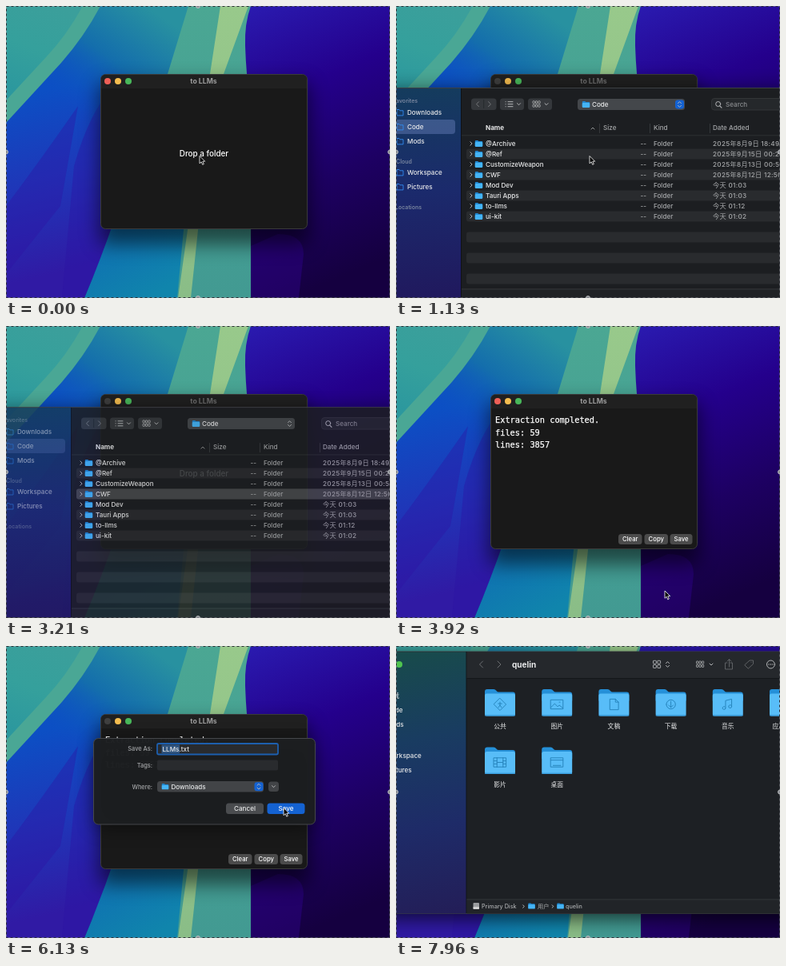
These frames come from a looping animation (480 px wide and 365 px high, 8 s). An HTML page:

```html
<!DOCTYPE html>
<html lang="en">
<head>
<meta charset="utf-8">
<title>to LLMs</title>
<style>
html, body { margin: 0; width: 100%; height: 100%; overflow: hidden; background: #1a0a60; }
svg { display: block; width: 480px; height: 365px; }
text { font-family: Inter, "Noto Sans CJK SC", "Noto Sans CJK", sans-serif; font-size: 8.1px; font-weight: 500; fill: #e8e9ea; white-space: pre; }
.mono text { font-family: "DejaVu Sans Mono", monospace; font-size: 10.3px; font-weight: 400; fill: #fff; stroke: #fff; stroke-width: .25px; }
.line { fill: none; stroke: #b4b6b8; stroke-linecap: round; stroke-linejoin: round; }
</style>
</head>
<body>
<svg id="stage" viewBox="0 0 480 365" xmlns="http://www.w3.org/2000/svg"></svg>
<script>
const LOOP = 8000;
const stage = document.getElementById('stage');
const range = (n, f) => Array.from({ length: n }, (_, i) => f(i)).join('');

// Markup helpers
const rect = (x, y, w, h, fill, r = 0, more = '') =>
  `<rect x="${x}" y="${y}" width="${w}" height="${h}" rx="${r}" fill="${fill}" ${more}/>`;
const text = (x, y, s, more = '') => `<text x="${x}" y="${y}" ${more}>${s}</text>`;
const mid = (x, y, s, more = '') => text(x, y, s, 'text-anchor="middle" ' + more);
const dot = (x, y, r, fill) => `<circle cx="${x}" cy="${y}" r="${r}" fill="${fill}"/>`;
const line = (d, w = 1, more = '') => `<path class="line" d="${d}" stroke-width="${w}" ${more}/>`;
const shape = (d, fill, opacity = 1) => `<path d="${d}" fill="${fill}" opacity="${opacity}"/>`;
const group = (id, body) => `<g id="${id}">${body}</g>`;
const css = s => `style="${s}"`;
const shadow = (x, y, w, h, opacity) => rect(x, y, w, h, '#000', 8, `opacity="${opacity}" filter="url(#soft)"`);
const gradient = (id, x1, y1, x2, y2, ...stops) =>
  `<linearGradient id="${id}" gradientUnits="userSpaceOnUse" x1="${x1}" y1="${y1}" x2="${x2}" y2="${y2}">` +
  stops.map((c, i) => `<stop offset="${i / (stops.length - 1)}" stop-color="${c}"/>`).join('') + '</linearGradient>';

// Small icons
const folder = (x, y, s = 1) => `<g transform="translate(${x} ${y}) scale(${s})">` +
  shape('M-4.7 -3q0 -1 1 -1h2.5l1 1h4q.9 0 .9 1v5h-9.4z', '#2187cf') +
  rect(-4.7, -2, 9.4, 6, '#45b4f5', 1) + '</g>';
const right = (x, y, s) => line(`M${x - s / 2} ${y - s}l${s} ${s}l${-s} ${s}`);
const left = (x, y, s) => line(`M${x + s / 2} ${y - s}l${-s} ${s}l${s} ${s}`);
const down = (x, y) => line(`M${x - 2} ${y - 1}l2 2l2 -2`);
const upDown = (x, y) => line(`M${x - 2} ${y - 1.4}l2 -2l2 2M${x - 2} ${y + 1.4}l2 2l2 -2`);
const tiles = (x, y) => range(6, i =>
  rect(x + i % 3 * 3.4, y + (i > 2 ? 4.4 : 0), 2.4, 3, 'none', .5, 'stroke="#b4b6b8" stroke-width=".8"'));
const outline = (x, y) => line(`M${x - 4} ${y + 3.5}v-7h3l1 1.3h4v5.7z`, .9, css('stroke:#318bf0'));

const defs = '<defs>' +
  gradient('indigo', 300, 0, 440, 330, '#2a1bb0', '#24008c', '#1d0062', '#150040') +
  gradient('blue', 30, 110, 80, 330, '#0c4fc4', '#1f36b8', '#301aa4') +
  gradient('sea', 175, 0, 85, 130, '#2891a0', '#146eac', '#0c4fc400') +
  gradient('deep', 100, 230, 180, 365, '#0e62b6', '#1085ac') +
  gradient('mint', 0, 0, 0, 365, '#4ba793', '#45a094', '#429a92') +
  gradient('corner', 20, 110, 60, 0, '#2c989e', '#35a09c', '#3b9f9b') +
  gradient('lime', 0, 0, 0, 365, '#98c98b', '#8abd87') +
  gradient('side', 0, 103, 20, 365, '#143c5d', '#1b2a6c', '#20195e') +
  gradient('finderSide', 10, 7, 70, 334, '#184b4b', '#193c61', '#1e2b68', '#231e58') +
  '<filter id="soft" x="-30%" y="-35%" width="160%" height="180%"><feGaussianBlur stdDeviation="12"/></filter></defs>';

const wallpaper =
  rect(0, 0, 480, 365, 'url(#indigo)') +
  shape('M306 300L340 285Q372 285 372 310L366 365H306z', '#30048c', .45) +
  shape('M0 0H250V200L150 240L98 365H0z', 'url(#blue)') +
  shape('M0 250Q45 190 90 125L68 250L0 335z', '#3010a0', .35) +
  shape('M85 200Q105 130 135 100V275L98 365H70z', '#2c12a2', .4) +
  shape('M0 0H250V220H0z', 'url(#sea)') +
  shape('M165 170H245V365H98Q140 265 165 170z', 'url(#deep)') +
  shape('M228 0H306Q298 22 299 50Q300 85 306 130V365H214L222 280L202 85z', 'url(#mint)') +
  shape('M268 0H303L272 85L240 280L231 365H215L227 280L255 85z', 'url(#lime)') +
  shape('M0 0H118Q98 38 69 71L0 146z', '#4aa795') +
  shape('M0 0H96Q75 38 50 64L0 118z', 'url(#corner)');

const button = (x, w, s) => rect(x, 260, w, 13, '#4b4b4b', 3.5) + mid(x + w / 2, 269.3, s, css('font-size:7.7px;fill:#fff'));
const app =
  shadow(116, 96, 263, 202, .55) +
  rect(118.5, 85.5, 258, 193, '#191919', 6, 'stroke="#3a3a3a"') +
  shape('M119 103V92q0 -6 6 -6H370q6 0 6 6V103z', '#202020') +
  `<circle id="red" cx="127" cy="94" r="4"/>` + dot(140, 94, 4, '#f5bd4f') + dot(153, 94, 4, '#48b85a') +
  mid(247, 97, 'to LLMs', 'id="title" ' + css('font-size:8.7px;font-weight:700;fill:#9c9c9c')) +
  group('prompt', mid(247.5, 188.3, 'Drop a folder', css('font-size:9.9px;fill:#fff'))) +
  group('result',
    `<g class="mono">${text(124, 121.3, 'Extraction completed.')}${text(124, 136.8, 'files: 59')}${text(124, 152.3, 'lines: 3857')}</g>` +
    button(278, 29.5, 'Clear') + button(310.5, 29.5, 'Copy') + button(342.5, 28, 'Save'));

const entries = [
  ['@Archive', '2025年8月9日 18:49'], ['@Ref', '2025年9月15日 00:21'],
  ['CustomizeWeapon', '2025年8月13日 00:52'], ['CWF', '2025年8月12日 12:50'],
  ['Mod Dev', '今天 01:03'], ['Tauri Apps', '今天 01:03'], ['to-llms', '今天 01:12'], ['ui-kit', '今天 01:02']
];
const PICKED = 3;
const grey = css('fill:#a6a8aa');
const heading = css('font-size:7px;font-weight:600;fill:#78859f');
const place = (y, s) => outline(5, y) + text(14, y + 3, s);
const row = ([name, date], i) => {
  const y = 172 + 13 * i;
  return right(94, y, 2.2) + folder(103.5, y) + text(112, y + 3, name) + text(313, y + 3, '--', 'text-anchor="end" ' + grey) +
    text(322, y + 3, 'Folder', grey) + text(396, y + 3, date, css('font-size:8.2px;letter-spacing:.3px;fill:#a6a8aa'));
};
const picker =
  shadow(-20, 106, 520, 280, .6) +
  rect(-10, 102.5, 500, 300, '#1c1e21', 0, 'stroke="#3d4044"') +
  rect(0, 103, 81, 262, 'url(#side)') + rect(81, 103, 1, 262, '#101216') +
  group('places', rect(-4, 142, 78, 18, '#8aa0e0', 4, 'opacity=".32"') +
    text(-4, 121, 'Favorites', heading) + place(133, 'Downloads') + place(151, 'Code') + place(169, 'Mods') +
    text(0, 196.5, 'Cloud', heading) + place(208, 'Workspace') + place(226, 'Pictures') + text(-1, 253.5, 'Locations', heading)) +
  rect(94, 115.5, 31.5, 14.5, '#35383c', 3.5) + rect(109.5, 117, .6, 11, '#1c1e21') +
  `<g opacity=".5">${left(102, 122.7, 3)}${right(117, 122.7, 3)}</g>` +
  rect(130, 115.5, 30, 14.5, '#35383c', 3.5) + line('M137 119.7h.2M137 122.7h.2M137 125.7h.2M140 119.7h6M140 122.7h6M140 125.7h6') + down(153.5, 122.7) +
  rect(165, 115.5, 30, 14.5, '#35383c', 3.5) + tiles(171, 118.8) + down(188, 122.7) +
  rect(227, 116, 134, 14, '#44474b', 3.5) + folder(237.5, 123) + text(245, 126, 'Code') +
  group('pickerMark', rect(349, 117.5, 11, 11, '#1462d2', 3)) + upDown(354.5, 123) +
  rect(394.5, 115.5, 100, 14.5, '#25282b', 3.5, 'stroke="#3a3d40" stroke-width=".7"') +
  line('M405 125.2l2 2', 1.1) + '<circle class="line" cx="402.7" cy="122.5" r="3"/>' + text(412, 126, 'Search', css('fill:#8a8c8f')) +
  text(112, 155.3, 'Name', css('font-weight:700')) + line('M244 154l2 -2l2 2', .8) +
  text(259, 155.3, 'Size', grey) + text(322, 155.3, 'Kind', grey) + text(396, 155.3, 'Date Added', grey) +
  [254, 317, 392].map(x => rect(x, 147, .8, 12, '#3c3f43')).join('') + rect(82, 161.5, 398, .7, '#35383b') +
  range(7, i => rect(88, 178.5 + 26 * i, 400, 13, '#292b2e', 3)) +
  rect(88, 165.5 + 13 * PICKED, 400, 13, '#0a58c8', 3, 'id="picked"') +
  entries.map(row).join('') +
  rect(82, 354, 398, 11, '#202225') + rect(82, 353.5, 398, .8, '#3a3d40');

const label = (y, s) => text(183, y, s, 'text-anchor="end" ' + css('font-size:7.4px;fill:#a4a6a8'));
const saver =
  shadow(112, 122, 271, 104, .5) +
  rect(109.5, 115.5, 277, 107.5, '#1c1e21', 6, 'stroke="#45474a" fill-opacity=".97"') +
  label(131.3, 'Save As:') + label(151.5, 'Tags:') + label(178.7, 'Where:') +
  rect(189, 122, 151, 13.5, '#292b2e', 2) + rect(189, 142.5, 151, 13, '#292b2e', 2) +
  rect(189, 122, 151, 13.5, 'none', 2, 'id="ring" stroke="#1d5fae" stroke-width="1.8"') +
  rect(194.5, 123.5, 22.5, 10.5, '#31557f') + text(195.5, 131.6, 'LLMs.txt') +
  rect(189, 169, 133, 13.5, '#424447', 3.5) + folder(199, 175.7, .9) + text(206.5, 178.7, 'Downloads') +
  group('saverMark', rect(310.5, 170.3, 11, 11, '#1462d2', 3)) + upDown(316, 175.7) +
  rect(328, 169.5, 13, 12.5, '#424447', 3.5) + down(334.5, 175.7) +
  rect(275, 196.5, 47, 13.5, '#4a4c4f', 3.5) + mid(298.5, 206.2, 'Cancel') +
  rect(326.5, 196.5, 47, 13.5, '#2b2d30', 3.5, 'id="saveBox"') + mid(350, 206.2, 'Save', 'id="saveText"');

// Glyphs drawn on the folder fronts, centred on 0,0
const glyphs = [
  'M0 -8l8 8l-8 8l-8 -8zM0 -3v4l-2 3M0 1l2 3M-2.4 -1h4.8',
  'M-8 -6H8V6H-8zM-8 4l5 -5l4 4l2 -2l5 4M3 -3h1',
  'M-5 -7H2L6 -3V7H-5zM2 -7V-3H6',
  'M0 -4V4M-3 1l3 3l3 -3M-6 0a6 6 0 1 0 12 0a6 6 0 1 0 -12 0',
  'M-3 5V-5L5 -7V3M-3 5a2 2 0 1 1 -1 -2M5 3a2 2 0 1 1 -1 -2',
  'M-6 6L0 -6L6 6M-5 2H5',
  'M-8 -6H8V6H-8zM-4 -6V6M4 -6V6M-4 0H4M-8 -2h4M-8 2h4M4 -2h4M4 2h4',
  'M-8 -6H8V6H-8zM-8 -3H8M-5 4H5'
];
const bigFolder = (name, i) => {
  const x = 130 + 71.2 * (i % 6), y = i < 6 ? 71 : 143.5;
  return `<g transform="translate(${x} ${y})">` +
    shape('M-19 -14q0 -3 3 -3h8q2 0 3.5 2t3.5 1.5h17q3 0 3 3v8h-38z', '#2590d8') +
    rect(-19, -11.5, 38, 28, '#58bdf8', 2.5) + rect(-19, 15, 38, 1.5, '#3a9fdf', .7) +
    line(glyphs[i], 1, 'transform="translate(0 2) scale(.95)" ' + css('stroke:#2583bb')) + '</g>' +
    mid(x, y + 32.3, name, css('font-size:7.8px'));
};
const crumb = css('font-size:7.2px;fill:#a9abad');
const finder =
  shadow(-30, 14, 540, 326, .7) +
  rect(-60, 7, 600, 327.5, '#1d2024', 0, 'stroke="#3c3f42"') +
  rect(-60, 7.5, 148, 327, 'url(#finderSide)') + rect(87.5, 7, 1, 327, '#111418') +
  rect(88.5, 7.5, 400, 33, '#25282c') + rect(88.5, 40, 400, .8, '#121417') +
  dot(4, 23, 4, '#4fc44f') +
  [['下载', 62], ['Code', 80], ['Mods', 98], ['Workspace', 137], ['Pictures', 155]].map(([s, y]) => text(-12, y + 3, s)).join('') +
  `<g opacity=".5">${left(106.5, 23, 4)}${right(129, 23, 4)}</g>` +
  text(145, 26.8, 'quelin', css('font-size:10px;font-weight:700')) +
  range(4, i => rect(321.5 + i % 2 * 5.3, 18.3 + (i > 1 ? 5.3 : 0), 3.8, 3.8, 'none', .6, 'stroke="#b4b6b8" stroke-width=".9"')) +
  upDown(339.5, 23) + tiles(375.5, 19) + down(394, 23) +
  `<g opacity=".4">${line('M414 21h-2.5v8h9v-8h-2.5M416.5 26v-9M414 19l2.5 -2.5l2.5 2.5')}` +
  line('M436 23.5l6 -5.5h4.5v4.5l-6 5.5zM444 20.3h.1') + '</g>' +
  '<circle class="line" cx="468.5" cy="23" r="5"/>' + line('M466 23h.1M468.5 23h.1M471 23h.1', 1.3) +
  ['公共', '图片', '文稿', '下载', '音乐', '应用程序', '影片', '桌面'].map(bigFolder).join('') +
  rect(88.5, 316.5, 400, 18, '#212428') + rect(88.5, 316.5, 400, .8, '#373a3d') +
  rect(96.5, 321, 7.5, 8, '#9a9c9e', 1) + rect(96.5, 326, 7.5, 3, '#d0d0d0', 1) +
  text(107, 328, 'Primary Disk', crumb) + right(159.5, 325.5, 1.7) + folder(169.5, 325, .9) +
  text(177, 328, '用户', crumb) + right(196, 325.5, 1.7) + folder(205.5, 325, .9) + text(212, 328, 'quelin', crumb);

const frame =
  rect(.5, .5, 479, 364, 'none', 0, 'stroke="#b9bcc0" stroke-opacity=".4"') +
  rect(.5, .5, 479, 364, 'none', 0, 'stroke="#303238" stroke-dasharray="3 3"') +
  [[240, 0], [240, 365], [0, 182.5], [480, 182.5]].map(([x, y]) => `<circle cx="${x}" cy="${y}" r="2.6" fill="#8c8f94" stroke="#d0d2d4" stroke-width=".7"/>`).join('');

stage.innerHTML = defs + wallpaper + group('app', app) + group('picker', picker) + group('saver', saver) + group('finder', finder) +
  group('pointer', '<path d="M0 0V9.3L2.2 7.3L3.7 10.8L5.3 10.1L3.8 6.7H6.7z" fill="#000" stroke="#fff" stroke-width=".8" stroke-linejoin="round"/>') + frame;

const ui = {};
stage.querySelectorAll('[id]').forEach(e => ui[e.id] = e);

// Motion
const clamp = v => Math.min(1, Math.max(0, v));
const smooth = v => v * v * (3 - 2 * v);
const fade = (t, from, to) => smooth(clamp((t - from) / (to - from)));
const track = [
  [0, 242, 187.5], [1350, 242, 187.5], [1750, 214, 209], [2150, 214, 209], [2750, 500, 400], [3450, 500, 400],
  [3880, 336, 331], [4050, 336, 331], [4650, 355, 269.5], [5700, 355, 269.5], [6150, 347, 202], [6600, 347, 202],
  [6750, 344, 223], [7250, 290, 385], [8000, 290, 385]
];
function pointerAt(t) {
  const i = track.findIndex(k => k[0] > t);
  const [t0, x0, y0] = track[i - 1], [t1, x1, y1] = track[i];
  const k = smooth((t - t0) / (t1 - t0));
  return [x0 + (x1 - x0) * k, y0 + (y1 - y0) * k];
}
const show = (e, on) => e.setAttribute('display', on ? 'inline' : 'none');

// Panels slide down while fading in and back up while fading out
function panel(e, t, open, close) {
  const a = fade(t, open, open + 210) * (1 - fade(t, close, close + 230));
  show(e, a > 0);
  e.setAttribute('opacity', a);
  e.setAttribute('transform', `translate(0 ${-7 * (1 - a)})`);
  return { shown: a > 0, active: a === 1 };
}

function draw(t) {
  const pick = panel(ui.picker, t, 600, 3160);
  const save = panel(ui.saver, t, 5310, 6570);
  const blocked = pick.shown || save.shown;
  ui.red.setAttribute('fill', blocked ? '#3f3f3f' : '#ee5f57');
  ui.title.style.fill = pick.shown ? '#6c6c6c' : '#9c9c9c';
  show(ui.prompt, t < 3420);
  show(ui.result, t >= 3420);

  ui.places.setAttribute('opacity', pick.active ? 1 : .6);
  show(ui.pickerMark, pick.active);
  show(ui.picked, t > 1880);
  ui.picked.setAttribute('fill', pick.active ? '#0a58c8' : '#46484b');

  show(ui.ring, save.active);
  show(ui.saverMark, save.active);
  ui.saveBox.setAttribute('fill', save.active ? '#1462d2' : '#2b2d30');
  ui.saveText.style.fill = save.active ? '#fff' : '#6c6e70';

  const f = fade(t, 7580, 7780), s = .92 + .08 * f;
  show(ui.finder, f > 0);
  ui.finder.setAttribute('opacity', f);
  ui.finder.setAttribute('transform', `translate(240 170) scale(${s}) translate(-240 -170)`);

  const [x, y] = pointerAt(t);
  ui.pointer.setAttribute('transform', `translate(${x} ${y})`);
}

const start = performance.now();
function tick() {
  draw((performance.now() - start) % LOOP);
  requestAnimationFrame(tick);
}
draw(0);
requestAnimationFrame(tick);
</script>
</body>
</html>
```
